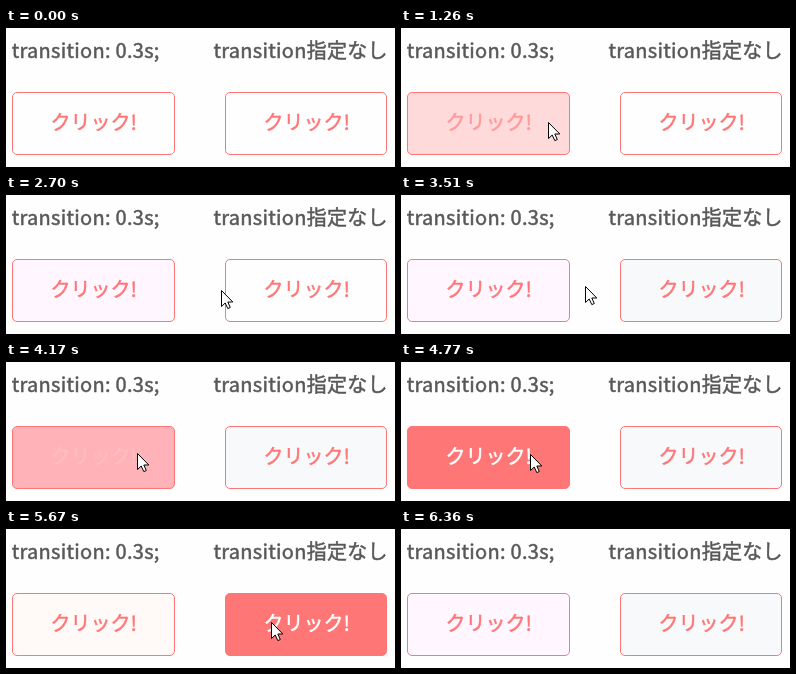
An HTML page that plays this animation: 389x139 px, repeating every 6990 ms.

```html
<!DOCTYPE html>
<html lang="ja">
<head>
<meta charset="utf-8">
<style>
  html, body { margin: 0; width: 100%; height: 100%; overflow: hidden; background: #fefefe; }
  svg { display: block; }
  text { font: 400 20px "Noto Sans CJK JP", "Noto Sans CJK", sans-serif; stroke-width: 0.5px; }
  .head { fill: #595757; stroke: #595757; letter-spacing: 0.28px; }
  .button text { text-anchor: middle; }
  rect { stroke: #ff7676; }
</style>
</head>
<body>
<svg width="389" height="139" viewBox="0 0 389 139">
  <text class="head" x="5.7" y="30">transition: 0.3s;</text>
  <text class="head" x="207.5" y="30">transition指定なし</text>
  <g class="button">
    <rect x="6.5" y="64.5" width="162" height="62" rx="4.5"/>
    <text x="87.7" y="102">クリック!</text>
  </g>
  <g class="button">
    <rect x="219.5" y="64.5" width="161" height="62" rx="4.5"/>
    <text x="300.7" y="102">クリック!</text>
  </g>
  <path id="cursor" d="M.5.5V16.5L4.2 13 6.8 18.6 9.3 17.5 6.8 12H11.8Z" fill="#fff" stroke="#000"/>
</svg>
<script>
const LOOP = 6990, STEP = 30, FADE = 270;
const RED = [255, 118, 118], WHITE = [255, 255, 255], PAGE = [254, 254, 254];
const LILAC = [255, 246, 255], CREAM = [255, 250, 248], MIST = [247, 249, 251];

// Pointer moves: start, duration, then where it comes to rest
const moves = [
  [640, 260, 195, 95],
  [1110, 240, 125, 93],
  [1890, 200, 196, 95],
  [2600, 300, 270, 94],
  [3100, 400, 184, 91],
  [4020, 240, 107, 91],
  [4690, 240, 191, 93],
  [5440, 230, 265, 93],
  [5920, 430, 178, 140]
];

const cursor = document.getElementById("cursor");
const [left, right] = document.querySelectorAll(".button");

const clamp = x => Math.min(1, Math.max(0, x));
const smooth = u => u * u * (3 - 2 * u);
const mix = (a, b, p) => a + (b - a) * p;
const mixColor = (a, b, p) => `rgb(${a.map((v, i) => Math.round(mix(v, b[i], p)))})`;

// CSS "ease": cubic-bezier(.25, .1, .25, 1)
function ease(x) {
  const bezier = (a, b, u) => 3 * a * u * (1 - u) ** 2 + 3 * b * u * u * (1 - u) + u ** 3;
  let lo = 0, hi = 1;
  for (let i = 0; i < 20; i++) {
    const mid = (lo + hi) / 2;
    if (bezier(0.25, 0.25, mid) < x) lo = mid; else hi = mid;
  }
  return bezier(0.1, 1, lo);
}

function pointer(t) {
  let x = 197, y = 140;
  for (const [start, duration, toX, toY] of moves) {
    const p = smooth(clamp((t - start) / duration));
    x = mix(x, toX, p);
    y = mix(y, toY, p);
  }
  return [x, y];
}

const overLeft = t => pointer(t)[0] < 169;
const overRight = t => pointer(t)[0] > 219;

// Moments when the pointer enters or leaves the left button
const crossings = [];
for (let t = 1; t < LOOP; t++) {
  if (overLeft(t) !== overLeft(t - 1)) crossings.push(t);
}
const fade = t => crossings.reduce(
  (sum, at, i) => sum + (i % 2 ? -1 : 1) * ease(clamp((t - at) / FADE)), 0);

function paint(button, rest, p) {
  const [box, label] = button.children;
  box.style.fill = mixColor(rest, RED, p);
  label.style.fill = label.style.stroke = mixColor(RED, WHITE, p);
}

function draw(now) {
  const t = Math.floor(now % LOOP / STEP) * STEP;
  const rest = t < 1920 ? PAGE : t < 4400 || t > 6000 ? LILAC : CREAM;
  paint(left, rest, fade(t));
  paint(right, t < 3000 ? PAGE : MIST, overRight(t) ? 1 : 0);
  cursor.setAttribute("transform", `translate(${pointer(t).map(Math.round).join(" ")})`);
}

const start = performance.now();
function tick() {
  draw(performance.now() - start);
  requestAnimationFrame(tick);
}
tick();
</script>
</body>
</html>
```
